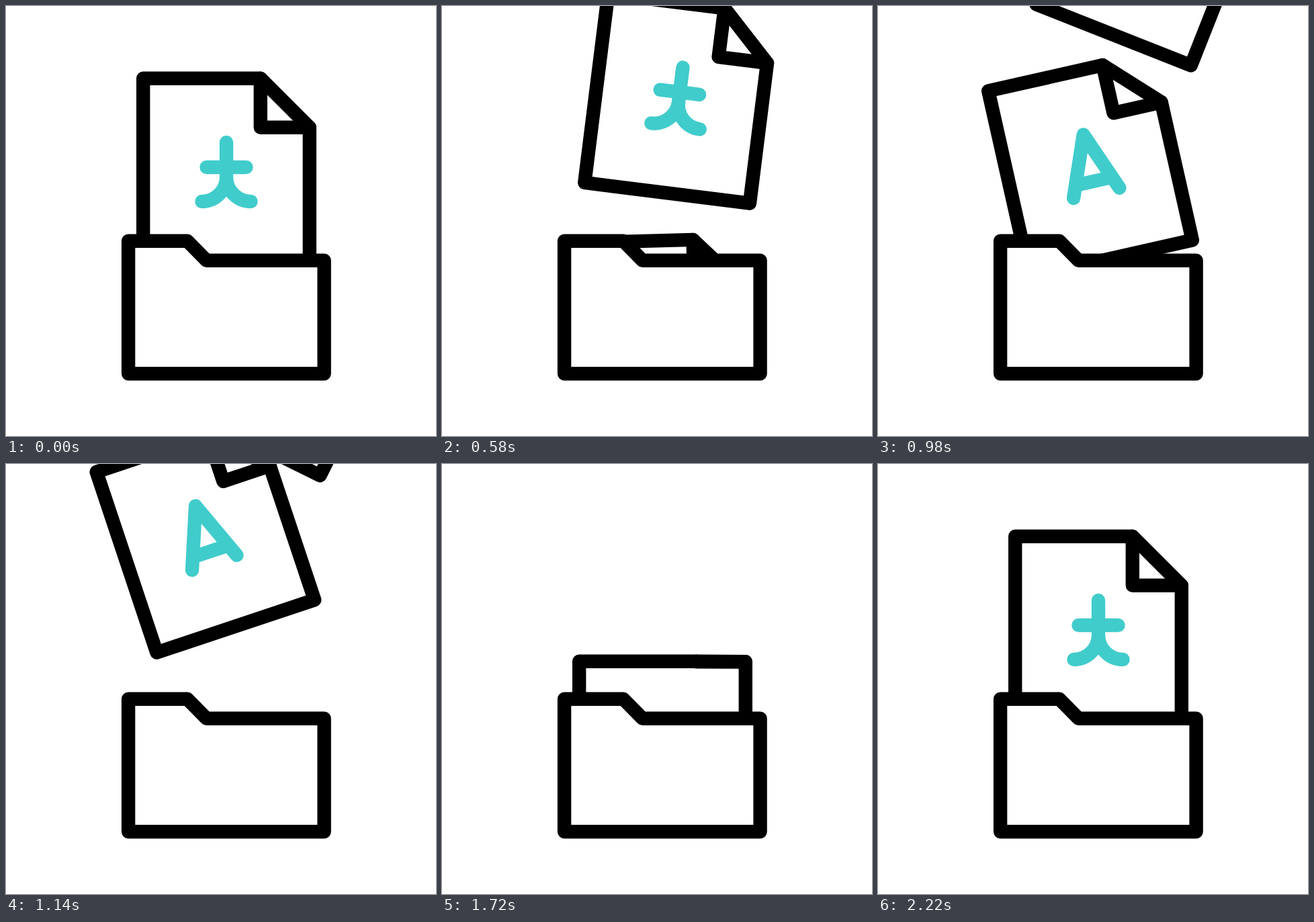
Write an HTML page that moves like this. It is 640x640 px and loops after 2.4 s.

```html
<!DOCTYPE html>
<html lang="en">
<head>
<meta charset="utf-8">
<title>Translated files</title>
<style>
  html, body { margin: 0; width: 100%; height: 100%; overflow: hidden; background: #fff; }
  svg { display: block; width: 100vw; height: 100vh; }
  path { stroke-width: 20.4; stroke-linecap: round; stroke-linejoin: round; fill: none; }
  .sheet, .folder { fill: #fff; stroke: #000; }
  .flap { stroke: #000; }
  .glyph { stroke: #40cccb; stroke-width: 20.4; }
</style>
</head>
<body>
<svg viewBox="0 0 640 640">
  <defs>
    <clipPath id="above"><rect width="640" height="460"/></clipPath>
    <path id="route" d="M328 526C319 350 338 86 211 -114L149 -212"/>
  </defs>
  <g clip-path="url(#above)">
    <g id="rising"></g>
    <g id="latin"></g>
    <g id="leaving"></g>
  </g>
  <path class="folder" d="M182.1 349.8H270L298.5 378.8H473.6V547.2H182.1Z"/>
</svg>
<script>
const LOOP = 2400, STEP = 20;
const REST = { x: 328, y: 249.5 };
const W = 123.8, H = 141.7, FOLD = 73;
const HAN = 'M0 -46.5V5A36.5 36.5 0 0 1 -36.5 41.5M0 5A36.5 36.5 0 0 0 36.5 41.5M-29.5 -9.5H29.5';
const LATIN = 'M-35 42L0 -47L35 42M-27 24H27';
const route = document.getElementById('route');
const routeLength = route.getTotalLength();

function makePage(id, glyph) {
  const g = document.getElementById(id);
  const add = (cls, d) => {
    const p = document.createElementNS('http://www.w3.org/2000/svg', 'path');
    p.setAttribute('class', cls);
    if (d) p.setAttribute('d', d);
    return g.appendChild(p);
  };
  const sheet = add('sheet'), flap = add('flap');
  add('glyph', glyph);
  const fold = k => {
    const x = W - FOLD, y = -H + FOLD * k;
    sheet.setAttribute('d', `M${-W} ${-H}H${x}L${W} ${y}V${H}H${-W}Z`);
    flap.setAttribute('d', `M${x} ${-H}V${y}H${W}`);
  };
  fold(1);
  const place = (x, y, a) => g.setAttribute('transform', `translate(${x} ${y}) rotate(${a})`);
  return { fold, place };
}

// Eased progress between two times
function ease(t, from, to) {
  const s = Math.min(1, Math.max(0, (t - from) / (to - from)));
  return s * s * (3 - 2 * s);
}

const leaving = makePage('leaving', HAN);
const latin = makePage('latin', LATIN);
const rising = makePage('rising', HAN);

function draw(t) {
  const out = ease(t, 200, 1400);
  leaving.place(REST.x + 104 * out, REST.y - 471 * out, 30 * out);

  const fly = ease(t, 400, 1800);
  const p = route.getPointAtLength(routeLength * fly);
  latin.place(p.x, p.y, -34 * fly);

  rising.place(REST.x, REST.y + 287 * (1 - ease(t, 1400, 2200)), 0);
  rising.fold(ease(t, 1700, 2100));
}

const start = performance.now();
function tick() {
  const t = (performance.now() - start) % LOOP;
  draw(Math.floor(t / STEP) * STEP);
  requestAnimationFrame(tick);
}
tick();
</script>
</body>
</html>
```
